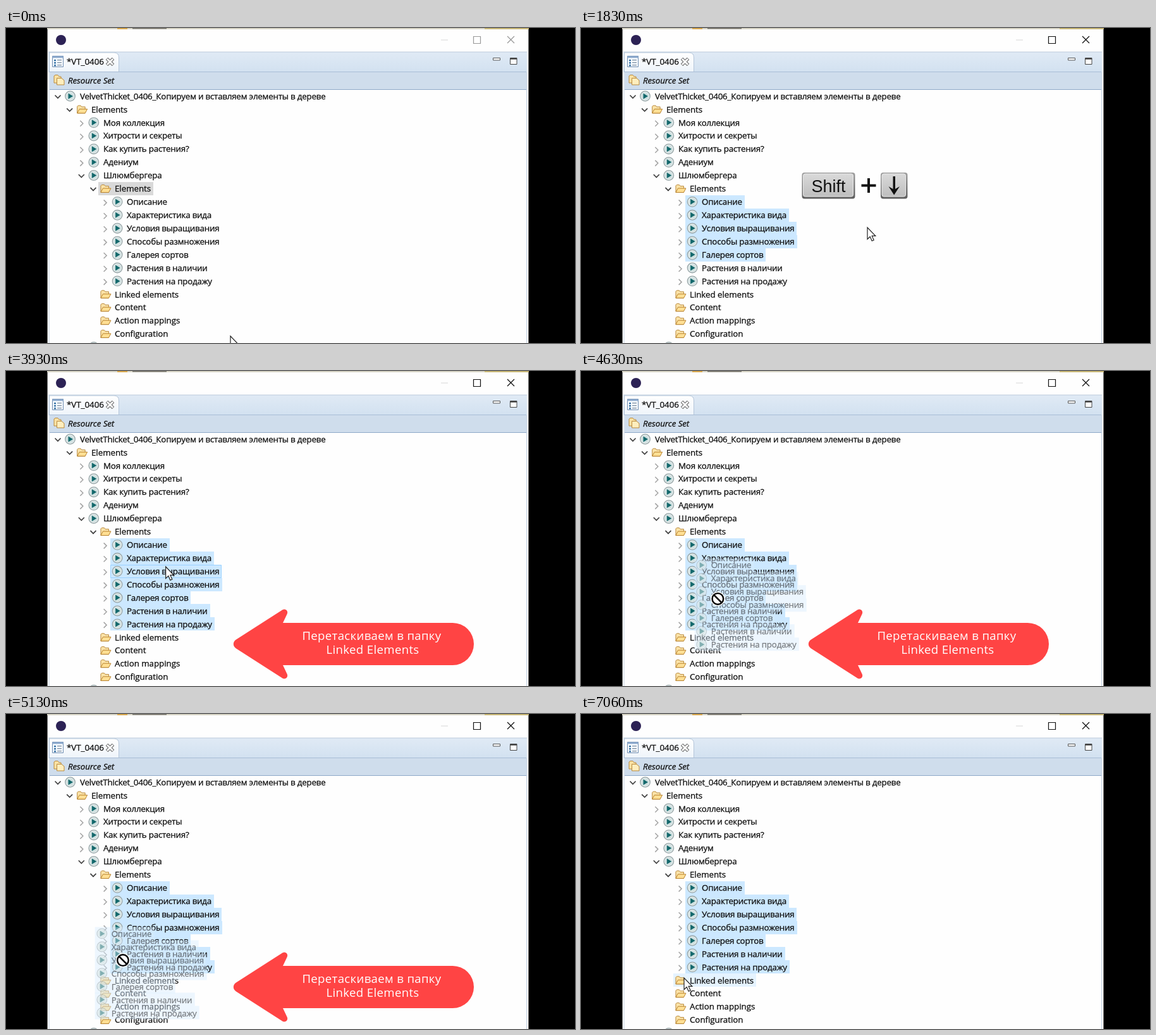
Recreate the animation shown at these times as an HTML page with a canvas. Size 900 px wide and 499 px high, loop 7100 ms.

```html
<!DOCTYPE html>
<html lang="ru">
<head>
<meta charset="utf-8">
<title>Tree drag and drop</title>
<style>
  html, body { margin: 0; width: 100%; height: 100%; overflow: hidden; background: #000; }
  canvas { display: block; width: 100vw; height: 100vh; }
</style>
</head>
<body>
<canvas id="stage" width="900" height="499"></canvas>
<script>
const ctx = document.getElementById('stage').getContext('2d');
const LOOP = 7100;
const FOCUS = 1000, SELECT = 1600, GRAB = 4500, LINK = 5460, DROP = 7060;
const UI_FONT = '"Open Sans", "Noto Sans", sans-serif';
const INK = '#111', SELECTED = '#cce8ff', HOVER = '#e5f3ff';
const FIRST_ITEM = 8, ITEMS = 7, LINKED_ROW = 15;

// Level, icon, expander (v open, > closed, blank none), label
const rows = [
  [0, 'play', 'v', 'VelvetThicket_0406_Копируем и вставляем элементы в дереве'],
  [1, 'folder', 'v', 'Elements'],
  [2, 'play', '>', 'Моя коллекция'],
  [2, 'play', '>', 'Хитрости и секреты'],
  [2, 'play', '>', 'Как купить растения?'],
  [2, 'play', '>', 'Адениум'],
  [2, 'play', 'v', 'Шлюмбергера'],
  [3, 'folder', 'v', 'Elements'],
  [4, 'play', '>', 'Описание'],
  [4, 'play', '>', 'Характеристика вида'],
  [4, 'play', '>', 'Условия выращивания'],
  [4, 'play', '>', 'Способы размножения'],
  [4, 'play', '>', 'Галерея сортов'],
  [4, 'play', '>', 'Растения в наличии'],
  [4, 'play', '>', 'Растения на продажу'],
  [3, 'folder', '', 'Linked elements'],
  [3, 'folder', '', 'Content'],
  [3, 'folder', '', 'Action mappings'],
  [3, 'folder', '', 'Configuration'],
  [2, 'play', '', '']
].map(([level, icon, expander, label], i) =>
  ({ x: 82 + 18.65 * level, y: 108 + 20.92 * i, icon, expander, label }));

const clamp = v => Math.max(0, Math.min(1, v));
const easeOut = k => 1 - (1 - k) ** 2;

// Pointer moves: start time, end time, destination
const moves = [
  [160, 860, 222, 272], [1160, 1460, 453, 316], [3300, 3600, 350, 125],
  [3600, 3930, 253, 310], [3930, 4160, 210, 317], [GRAB, 4830, 220, 386],
  [4830, 5130, 185, 390], [5130, 6060, 163, 418]
];

function pointerAt(t) {
  let x = 355, y = 488;
  for (const [start, end, toX, toY] of moves) {
    const k = easeOut(clamp((t - start) / (end - start)));
    x += (toX - x) * k;
    y += (toY - y) * k;
  }
  return [x, y];
}

// The dragged rows settle downwards and swing left halfway
const ghostOffset = t => [
  15 - 64 / (1 + Math.exp((5090 - t) / 88)),
  88 - 78 * Math.exp((GRAB - t) / 390)
];

function selectedCount(t) {
  if (t < FOCUS) return 0;
  if (t < SELECT) return 1;
  return t < 2460 ? Math.min(6, 2 + Math.floor((t - SELECT) / 76)) : ITEMS;
}

const FADE = 300;
const fade = (t, start, end) => clamp(Math.min(t - start, end - t) / FADE);

function box(x, y, w, h, fill, stroke, lineWidth = 1) {
  ctx.beginPath();
  ctx.rect(x, y, w, h);
  paint(fill, stroke, lineWidth);
}

function poly(points, fill, stroke, lineWidth = 1, open = false) {
  ctx.beginPath();
  for (let i = 0; i < points.length; i += 2) ctx.lineTo(points[i], points[i + 1]);
  if (!open) ctx.closePath();
  paint(fill, stroke, lineWidth);
}

function circle(x, y, r, fill, stroke, lineWidth) {
  ctx.beginPath();
  ctx.arc(x, y, r, 0, 2 * Math.PI);
  paint(fill, stroke, lineWidth);
}

function cross(x, y, r, color, lineWidth) {
  for (const s of [-r, r]) poly([x - r, y - s, x + r, y + s], null, color, lineWidth, true);
}

function paint(fill, stroke, lineWidth) {
  if (fill) { ctx.fillStyle = fill; ctx.fill(); }
  if (stroke) { ctx.strokeStyle = stroke; ctx.lineWidth = lineWidth; ctx.stroke(); }
}

function vertical(y0, y1, top, bottom) {
  const gradient = ctx.createLinearGradient(0, y0, 0, y1);
  gradient.addColorStop(0, top);
  gradient.addColorStop(1, bottom);
  return gradient;
}

function at(x, y, draw) {
  ctx.save();
  ctx.translate(x, y);
  draw();
  ctx.restore();
}

function withAlpha(alpha, draw) {
  ctx.globalAlpha = alpha;
  draw();
  ctx.globalAlpha = 1;
}

function treeFont(label, style = '') {
  ctx.font = `${style} 13.35px ${UI_FONT}`;
  ctx.letterSpacing = /[а-я]/i.test(label) ? '-0.2px' : '-0.05px';
}

function text(label, x, y, style) {
  treeFont(label, style);
  ctx.fillStyle = ctx.strokeStyle = INK;
  ctx.lineWidth = 0.3;
  ctx.fillText(label, x, y);
  ctx.strokeText(label, x, y);
}

const rowText = row => text(row.label, Math.round(row.x + 34.5), Math.round(row.y + 4.7));

function playIcon() {
  circle(0, 0, 7.8, '#e3ebeb', '#98a6a8', 1.3);
  circle(0, 0, 5.8, '#cfe0e0');
  poly([-3, -4.5, 4.5, 0, -3, 4.5], '#14686c');
}

function folderIcon() {
  poly([-7.5, 6, -7.5, -4.5, -6, -6, -2, -6, -0.5, -4, 5, -4, 5, 6], '#fbe3a8', '#b98a3e');
  poly([-7.5, 6, -4, -0.5, 8.5, -0.5, 5, 6], '#ffdf94', '#b9832f');
}

function drawHighlight(row, fill, border) {
  treeFont(row.label);
  const width = Math.round(ctx.measureText(row.label).width + 30);
  const x = Math.round(row.x + 8.5), y = Math.round(row.y - 10.5);
  box(x, y, width, 21, fill);
  if (border) box(x + 0.5, y + 0.5, width - 1, 20, null, border);
}

function drawRow(row) {
  at(row.x, row.y, () => {
    if (row.expander === 'v') poly([-4.5, -1.5, 0, 3, 4.5, -1.5], null, '#404040', 1.7, true);
    if (row.expander === '>') poly([-2, -3, 2.5, 1.5, -2, 6], null, '#a3a3a3', 1.5, true);
    ctx.translate(19.5, 0);
    row.icon === 'play' ? playIcon() : folderIcon();
  });
  rowText(row);
}

function drawWindow(active) {
  box(0, 0, 900, 499, '#000');
  box(65, 0, 762, 499, '#fefefe');
  // Sliver of the window behind
  box(65, 0, 762, 2, '#d8d5c6');
  box(176, 0, 16, 2, '#d9a84e');
  box(200, 0, 54, 1.5, '#77756d');
  box(757, 0, 70, 2, '#c9b877');
  for (const x of [65, 826]) box(x, 2, 1, 497, '#707070');

  circle(87, 19, 8, '#2c2255');
  const ink = active ? INK : '#999';
  box(688, 18.5, 11, 1, '#d5d5d5');
  box(739.5, 13.5, 11, 11, null, ink, 1.2);
  cross(798.5, 18.5, 5.5, ink, 1.2);

  box(67, 38, 757, 32, vertical(38, 70, '#e0eaf5', '#d2e1f0'));
  box(67, 37.5, 757, 1, '#bccbdc');
  ctx.beginPath();
  ctx.moveTo(68.5, 70);
  ctx.lineTo(68.5, 39);
  ctx.lineTo(171, 39);
  ctx.quadraticCurveTo(178.5, 39, 178.5, 47);
  ctx.lineTo(178.5, 70);
  paint(vertical(39, 70, '#fff', '#eef4fa'), '#b4c5d9', 1);
  box(69, 69, 754, 28, '#cfddec');
  box(69, 69, 754, 1, '#a9bdd6');
  box(69, 97, 754, 1, '#8fa9c8');
  for (const x of [67.5, 823]) box(x, 70, 1, 429, '#c3d2e4');

  box(73.5, 44.5, 17, 17, '#f7fbff', '#6f8db0');
  box(73.5, 44.5, 17, 3, '#8eabce');
  for (let y = 50; y < 60; y += 4) {
    box(76, y, 3, 2.5, '#3c76a8');
    box(81, y, 7, 1.5, '#8a9aac');
  }
  text('*VT_0406', 96, 58);
  cross(164.5, 53.5, 5, '#666', 5);
  cross(164.5, 53.5, 4.5, '#fff', 2.8);
  box(770.5, 47.5, 11, 3.5, '#fff', '#555');
  box(797.5, 47.5, 10.5, 10, '#fff', '#444');
  box(797.5, 48, 10.5, 1.8, '#444');

  poly([76, 87, 76, 76, 78, 74.5, 82, 74.5, 84, 77, 87, 77, 87, 87], '#fbe2a4', '#b98a3e');
  poly([80.5, 90, 80.5, 79.5, 88, 79.5, 92, 83, 92, 90], '#ffeebd', '#b98a3e');
  text('Resource Set', 98, 88, 'italic');
}

function drawTree(t) {
  const selected = selectedCount(t);
  if (!selected) drawHighlight(rows[FIRST_ITEM - 1], '#d9d9d9');
  if (t > 800 && t < FOCUS) drawHighlight(rows[FIRST_ITEM], HOVER);
  for (let i = 0; i < selected; i++) {
    const hovered = (i === 0 && t < 1160) || (i === 2 && t >= 3900 && t < GRAB);
    drawHighlight(rows[FIRST_ITEM + i], SELECTED, hovered && '#99d1ff');
  }
  if (t >= DROP) drawHighlight(rows[LINKED_ROW], HOVER);
  rows.forEach(drawRow);
}

function drawGhost(t) {
  withAlpha(0.45, () => at(...ghostOffset(t), () => {
    for (const row of rows.slice(FIRST_ITEM, FIRST_ITEM + ITEMS)) {
      drawHighlight(row, '#d8ecfc');
      at(row.x + 19.5, row.y, playIcon);
      rowText(row);
    }
  }));
}

function keyCap(x, width) {
  ctx.beginPath();
  ctx.roundRect(x, 229, width, 41.5, 4);
  paint(vertical(229, 270, '#a0a0a0', '#606060'));
  ctx.beginPath();
  ctx.roundRect(x + 2, 231, width - 5, 36, 3);
  paint(vertical(231, 267, '#d9d9d9', '#bebebe'), '#ececec', 1);
}

function drawKeys() {
  keyCap(349.5, 84);
  keyCap(474, 42.5);
  ctx.font = '27px "Liberation Sans", Arial, sans-serif';
  ctx.letterSpacing = '0px';
  ctx.fillStyle = INK;
  ctx.fillText('Shift', 364.5, 259.5);
  box(443.5, 247.5, 23, 4, INK);
  box(453, 238, 4, 23, INK);
  box(493.5, 235, 3.5, 24, INK);
  poly([486.5, 251, 495.2, 256, 504, 251, 495.2, 264.5], INK);
}

function drawCallout() {
  ctx.beginPath();
  ctx.moveTo(438, 399);
  ctx.arc(706.5, 432.5, 33.5, -Math.PI / 2, Math.PI / 2);
  ctx.lineTo(438, 466);
  ctx.arcTo(452, 496, 353, 432.5, 5);
  ctx.arcTo(353, 432.5, 452, 369, 8);
  ctx.arcTo(452, 369, 438, 399, 5);
  ctx.closePath();
  paint('#ff4444');
  ctx.fillStyle = '#fff';
  ctx.textAlign = 'center';
  ctx.font = `18.6px ${UI_FONT}`;
  ctx.letterSpacing = '0.35px';
  ctx.fillText('Перетаскиваем в папку', 578.5, 426);
  ctx.fillText('Linked Elements', 580, 448);
  ctx.textAlign = 'left';
}

function forbiddenSign() {
  circle(0, 0, 9, '#fff', '#fff', 4.5);
  circle(0, 0, 8.8, null, '#000', 2.4);
  poly([-6, -6, 6, 6], null, '#000', 2.6, true);
}

function arrowPointer() {
  poly([0, 0, 0, 18.5, 4.2, 14.5, 7.2, 21.3, 10.2, 20, 7.2, 13.4, 12.8, 13.4],
    '#fff', '#222', 1.2);
}

function linkBadge() {
  ctx.setLineDash([1.5, 1.5]);
  box(3, 19.5, 9, 8, null, '#333');
  ctx.setLineDash([]);
  box(11.5, 22.5, 12, 12, '#fff', '#000', 1.5);
  poly([14.5, 31.5, 20, 26], null, '#000', 1.8, true);
  poly([16.5, 25, 21, 25, 21, 29.5], '#000');
}

function drawPointer(t, dragging) {
  at(...pointerAt(t), () => {
    if (dragging && t < LINK) return forbiddenSign();
    arrowPointer();
    if (dragging) linkBadge();
  });
}

function render(t) {
  const dragging = t >= GRAB && t < DROP;
  drawWindow(t >= FOCUS);
  drawTree(t);
  withAlpha(fade(t, 160, 3600), drawKeys);
  withAlpha(fade(t, 3300, 5500), drawCallout);
  if (dragging) drawGhost(t);
  drawPointer(t, dragging);
}

const start = performance.now();
function tick() {
  render((performance.now() - start) % LOOP);
  requestAnimationFrame(tick);
}
tick();
</script>
</body>
</html>
```
